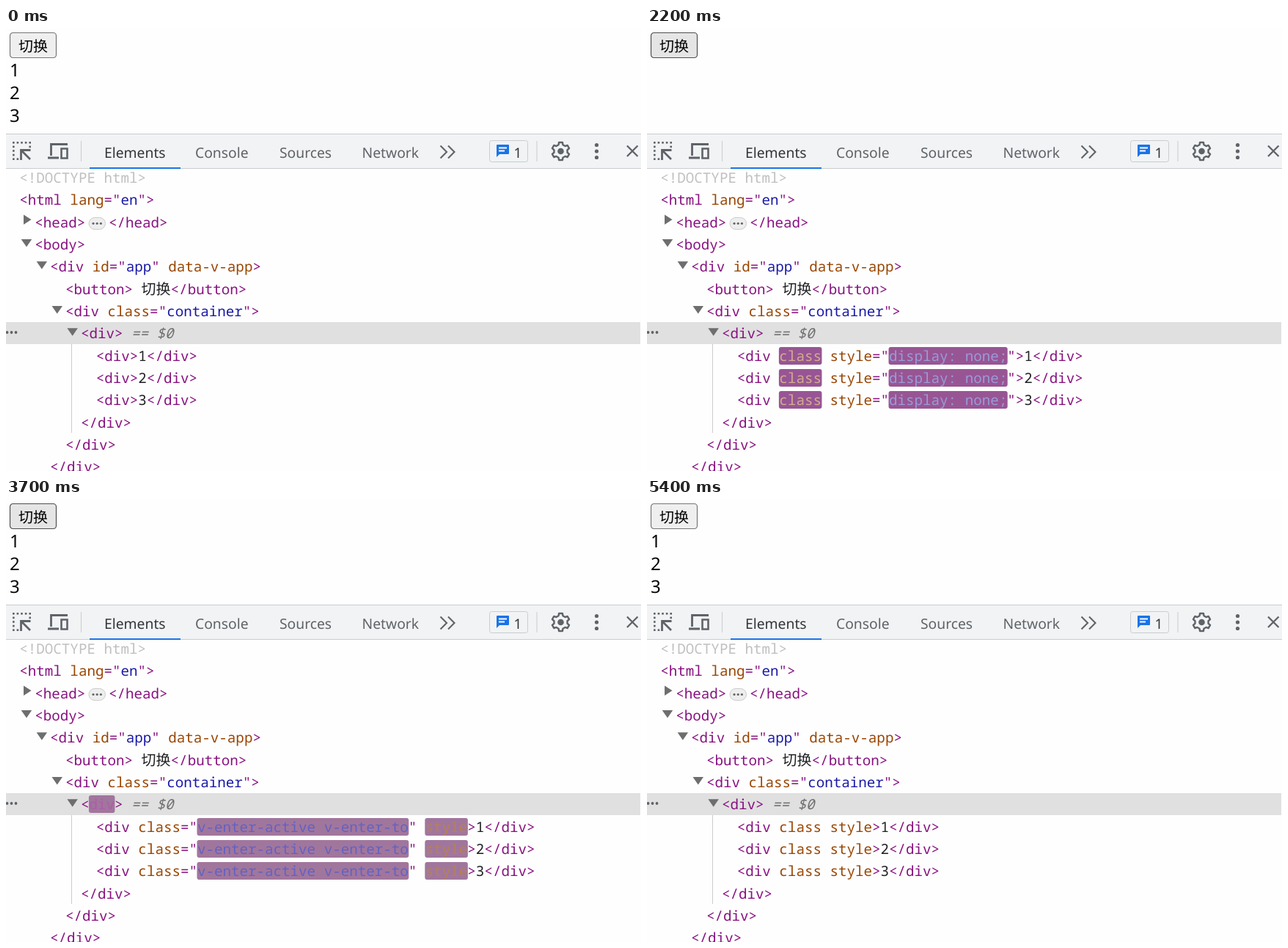
Animation, 866 px wide and 604 px high, one loop 6000 ms. Source, as an HTML page with a canvas:

```html
<!DOCTYPE html>
<html lang="en">
<head>
<meta charset="utf-8">
<title>List transition in the inspector</title>
<style>
  html, body { margin: 0; width: 100%; height: 100%; overflow: hidden; background: #fefefe; }
  canvas { display: block; }
</style>
</head>
<body>
<canvas id="stage" width="866" height="604"></canvas>
<script>
const ctx = document.getElementById('stage').getContext('2d');
const LOOP = 6000, STEP = 100;
const HOVER = 600, LEAVE = 1000, HIDDEN = 2000, ENTER = 3300, SHOWN = 4200, UNHOVER = 4600;
const FADE = 500, FLASH = 1200;

const MONO = '19.2px "Noto Sans Mono", monospace';
const CJK = '20px "Noto Sans CJK SC", "Noto Sans CJK", sans-serif';
const sans = size => `${size}px "Noto Sans", sans-serif`;
const TAG = [136, 18, 128], ATTR = [153, 69, 0], VALUE = [26, 26, 166];
const TEXT = [32, 33, 36], MUTED = [192, 192, 192], GREY = [110, 110, 110];
const WHITE = [255, 255, 255], FLASH_END = [168, 148, 166];
const ICON = '#5f6368', LINE = '#cacdd1';

const clamp = v => Math.min(1, Math.max(0, v));
const rgb = (c, alpha = 1) => `rgba(${c.map(Math.round)}, ${alpha})`;
const mix = (a, b, k) => a.map((v, i) => v + (b[i] - v) * k);

function bezier(x1, y1, x2, y2) {
  const at = (a, b, s) => 3 * a * s * (1 - s) ** 2 + 3 * b * s * s * (1 - s) + s ** 3;
  return x => {
    let low = 0, high = 1;
    for (let i = 0; i < 24; i++) {
      const mid = (low + high) / 2;
      if (at(x1, x2, mid) < x) low = mid; else high = mid;
    }
    return at(y1, y2, high);
  };
}
const ease = bezier(.25, .1, .25, 1), easeOut = bezier(0, 0, .2, 1);

// Drawing helpers
function box(x, y, w, h, r, fill, stroke, width = 1) {
  ctx.beginPath();
  ctx.roundRect(x, y, w, h, r);
  if (fill) { ctx.fillStyle = fill; ctx.fill(); }
  if (stroke) { ctx.strokeStyle = stroke; ctx.lineWidth = width; ctx.stroke(); }
}
function rect(x, y, w, h, fill) {
  ctx.fillStyle = fill;
  ctx.fillRect(x, y, w, h);
}
function stroke(path, width, color = ICON) {
  ctx.strokeStyle = color;
  ctx.lineWidth = width;
  ctx.stroke(new Path2D(path));
}
function fill(path, color) {
  ctx.fillStyle = color;
  ctx.fill(new Path2D(path));
}
function dot(x, y, r, color = ICON) {
  box(x - r, y - r, 2 * r, 2 * r, r, color);
}
function label(text, x, y, font, color) {
  ctx.font = font;
  ctx.fillStyle = color;
  ctx.fillText(text, x, y);
}

// Page with the button and the list
function drawPage(t) {
  const pressed = (t >= LEAVE - 100 && t < LEAVE) || (t >= ENTER - 100 && t < ENTER);
  const hovered = t >= HOVER && t < UNHOVER;
  const [face, edge] = pressed ? ['#f5f5f5', '#8d8d8d']
    : hovered ? ['#e5e5e5', '#4f4f4f'] : ['#efefef', '#767676'];
  box(5.5, 6.5, 63, 34, 4, face, edge, 1.2);
  label('切换', 17, 32, CJK, '#000');

  const opacity = t < ENTER ? 1 - ease(clamp((t - LEAVE) / FADE)) : ease(clamp((t - ENTER) / FADE));
  if (opacity > 0) {
    [1, 2, 3].forEach((n, i) => label(n, 5, 66 + 31 * i, sans(24), `rgba(0, 0, 0, ${opacity})`));
  }
}

// Inspector toolbar
function drawGear(x, y) {
  const teeth = 6, radii = [9.2, 12.2, 12.2, 9.2], offsets = [-.33, -.2, .2, .33];
  ctx.beginPath();
  for (let i = 0; i < teeth; i++) {
    offsets.forEach((offset, k) => {
      const angle = i * 2 * Math.PI / teeth - Math.PI / 2 + offset;
      ctx.lineTo(x + radii[k] * Math.cos(angle), y + radii[k] * Math.sin(angle));
    });
  }
  ctx.closePath();
  ctx.lineJoin = 'round';
  ctx.strokeStyle = ICON;
  ctx.lineWidth = 2.4;
  ctx.stroke();
  ctx.lineJoin = 'miter';
  dot(x, y, 4.3);
}
function drawToolbar() {
  rect(0, 144, 866, 48, '#f1f3f4');
  rect(0, 144, 866, 1, LINE);
  rect(0, 191, 866, 1, LINE);
  rect(114, 190, 124, 2, '#1a73e8');
  rect(102, 154, 1, 28, LINE);
  rect(723.5, 154, 1, 28, LINE);

  for (let i = 0; i < 5; i++) {
    rect(9 + 5.6 * i, 155, 2.6, 2.6, ICON);
    if (i) rect(9, 155 + 5.6 * i, 2.6, 2.6, ICON);
  }
  rect(31.4, 160.6, 2.6, 2.6, ICON);
  rect(14.6, 177.4, 2.6, 2.6, ICON);
  stroke('M33.5 166.5H20.5V180M20.5 166.5L33 179', 2.8);
  stroke('M61.5 174V158.5H84M57 177H72', 2.8);
  stroke('M75.5 164.5H83.5V177.5H75.5Z', 2.6);

  [['Elements', 134], ['Console', 258], ['Sources', 373], ['Network', 485.5]].forEach(([text, x], i) =>
    label(text, x, 177, sans(19.3), i ? ICON : '#333639'));
  stroke('M592.5 160.5L601 169L592.5 177.5M603 160.5L611.5 169L603 177.5', 2.1);

  box(659.5, 153.5, 52, 29, 3, null, LINE);
  fill('M670 159H685Q686 159 686 160V171Q686 172 685 172H673L669 176V160Q669 159 670 159Z', '#1a73e8');
  stroke('M672 163.5H683M672 167.5H680', 1.8, '#fff');
  label('1', 692.5, 177, sans(19), '#333639');

  drawGear(756.5, 168);
  [159.5, 168, 176.5].forEach(y => dot(805.5, y, 2.6));
  stroke('M847 160.5L861.5 175M861.5 160.5L847 175', 2.3);
}

// Inspector tree: each token is [text, color, time its flash starts]
const tag = (text, flash) => [text, TAG, flash];
const attr = (text, flash) => [text, ATTR, flash];
const value = (text, flash) => [text, VALUE, flash];
const plain = text => [text, TEXT];
const baseline = row => 211 + 30.32 * row;
const indent = level => 18.3 + 20.9 * level;

function drawTokens(tokens, x, row, t) {
  const y = baseline(row);
  for (const [text, color, start] of tokens) {
    const age = (t - start) / FLASH;
    const flashing = age >= 0 && age < 1;
    ctx.font = /[切换]/.test(text) ? CJK : MONO;
    const width = ctx.measureText(text).width;
    if (flashing) {
      const back = age < .8
        ? rgb(mix(TAG, FLASH_END, easeOut(age / .8)))
        : rgb(FLASH_END, 1 - easeOut((age - .8) / .2));
      box(x - .5, Math.round(y - 19), width + 1, 24, 3, back);
    }
    label(text, x, y, ctx.font, rgb(flashing ? mix(WHITE, color, easeOut(age)) : color));
    x += width;
  }
  return x;
}
function drawRow(row, level, tokens, t, open) {
  const x = indent(level), y = baseline(row);
  if (open) fill(`M${x - 18.5} ${y - 14}h14.5l-7.25 10.5z`, '#6e6e6e');
  return drawTokens(tokens, x, row, t);
}

function itemAttributes(t) {
  if (t < LEAVE) return [];
  if (t < HIDDEN) {
    return [attr(' class'), tag('="'), value('v-leave-active v-leave-to', LEAVE), tag('"')];
  }
  if (t < ENTER) {
    return [plain(' '), attr('class', HIDDEN), attr(' style'), tag('="'),
      value('display: none;', HIDDEN), tag('"')];
  }
  if (t < SHOWN) {
    return [attr(' class'), tag('="'), value('v-enter-active v-enter-to', ENTER), tag('" '),
      attr('style', ENTER)];
  }
  return [plain(' '), attr('class', SHOWN), attr(' style')];
}

function drawTree(t) {
  rect(0, 401, 865, 30, '#e0e0e0');
  rect(89, 431, 1, 121, '#ccc');
  [1.5, 7.5, 13.5].forEach(x => dot(x, 415, 1.9));

  drawRow(0, 0, [['<!DOCTYPE html>', MUTED]], t);
  drawRow(1, 0, [tag('<html'), attr(' lang'), tag('="'), value('en'), tag('">')], t);

  fill('M24 254.5v13.5l10.5 -6.75z', '#6e6e6e');
  drawRow(2, 1, [tag('<head>')], t);
  box(113, 258.5, 22.5, 16, 8, '#eee', '#ccc');
  [119, 124.2, 129.4].forEach(x => dot(x, 266.5, 1.6));
  drawTokens([tag('</head>')], 140, 2, t);

  drawRow(3, 1, [tag('<body>')], t, true);
  drawRow(4, 2, [tag('<div'), attr(' id'), tag('="'), value('app'), tag('"'),
    attr(' data-v-app'), tag('>')], t, true);
  drawRow(5, 3, [tag('<button> '), plain('切换'), tag('</button>')], t);
  drawRow(6, 3, [tag('<div'), attr(' class'), tag('="'), value('container'), tag('">')], t, true);

  const listFlash = t < ENTER ? LEAVE : ENTER;
  const end = drawRow(7, 4, [tag('<'), tag('div', listFlash), tag('>')], t, true);
  label('== $0', end + 11.5, baseline(7), 'italic ' + MONO, rgb(GREY));

  for (let n = 1; n <= 3; n++) {
    drawRow(7 + n, 5, [tag('<div'), ...itemAttributes(t), tag('>'), plain(String(n)), tag('</div>')], t);
  }
  [4, 3, 2].forEach((level, i) => drawRow(11 + i, level, [tag('</div>')], t));
}

function draw(now) {
  const t = Math.floor(now % LOOP / STEP) * STEP;
  ctx.textRendering = 'geometricPrecision';
  rect(0, 0, 866, 604, '#fefefe');
  drawPage(t);
  drawToolbar();
  drawTree(t);
  requestAnimationFrame(draw);
}
requestAnimationFrame(draw);
</script>
</body>
</html>
```
